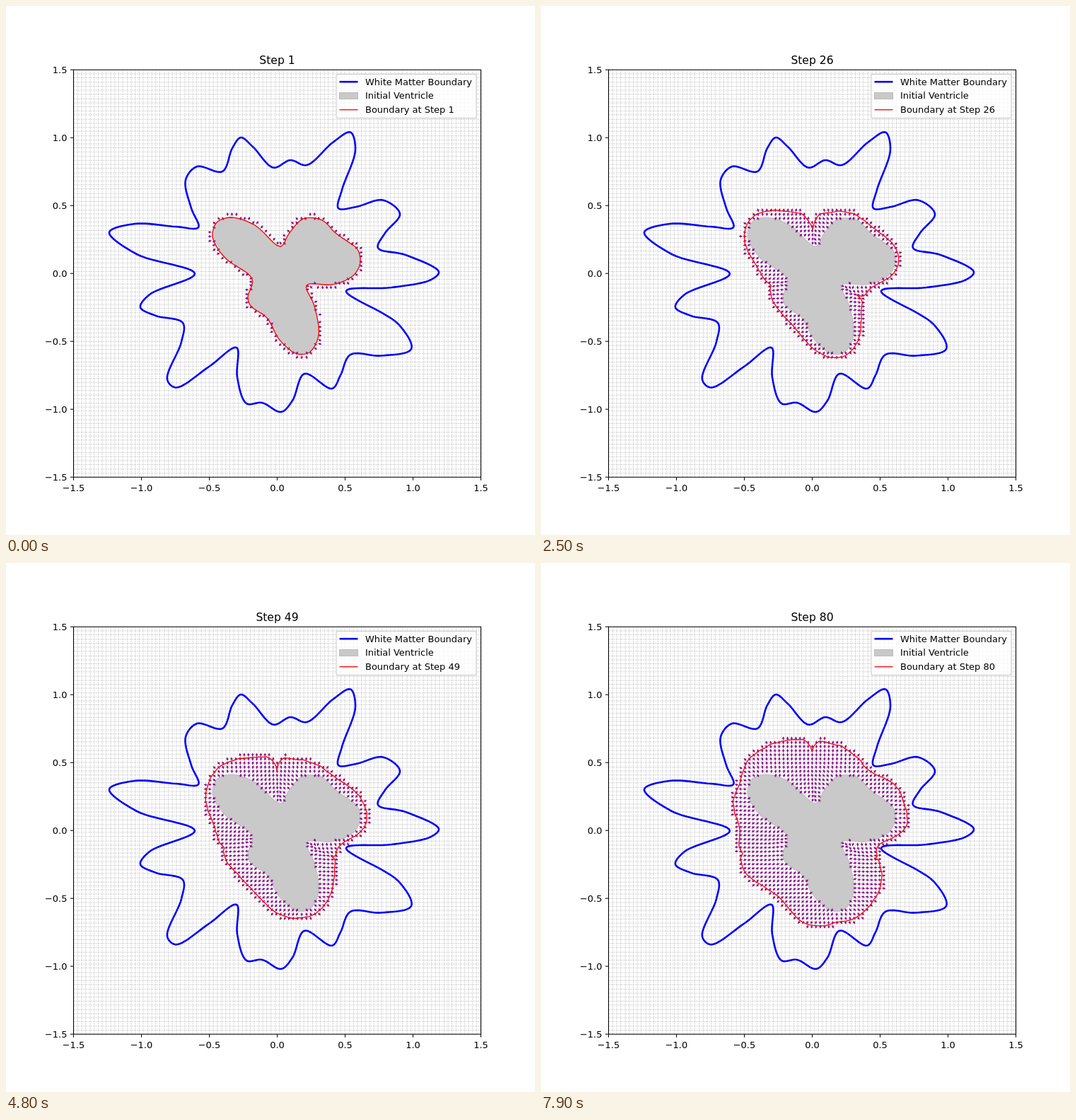
Animation, 748 px wide and 748 px high, one loop 8 s. Source, as an HTML page with a canvas:

```html
<!DOCTYPE html>
<html>
<head>
<meta charset="utf-8">
<style>
html, body { margin: 0; height: 100%; overflow: hidden; background: #fff }
canvas { display: block }
</style>
</head>
<body>
<canvas width="748" height="748"></canvas>
<script>
const ctx = document.querySelector('canvas').getContext('2d');
const STAGE = 748, LEFT = 95.5, TOP = 90.2, SIZE = 576, RIGHT = LEFT + SIZE, BOTTOM = TOP + SIZE;
const ZOOM = STAGE / 800, PT = ZOOM * 100 / 72;
const CELLS = 99, CELL = SIZE / CELLS, STEPS = 80;

const points = text => text.trim().split(/\s+/).map(p => p.split(',').map(Number));

// Key points at the tips, valleys and flanks of both outlines.
const whiteMatter = points(`
612,376 565,352 526,342 536,321 557,294 533,274.5 495,284 470,286 475,260 494,203 487,178.5
462,193 425,225 402,218 378,228.5 349,199 332,186 320,201 306,234 270,227 254,246 262,286
272,313 240,312 182,308 146,320 185,351 267,378.5 203,408 190,426 212,438 250,448 248,475
228,528 240,539.5 287,510 326,483 327,525 340,562 362,561 389,574 405,558 422,520 461,541
473,522 487,493 530,494.5 573,485 555,450 481,403 545,398 601,387`);
const initial = points(`
501,362 497,344 486,335 466,321 449,304 433,299.5 418,302 400,322 388,340 352,310
318,299 298,306 292,324 298,341 313,359 348,386 342,412 346,424 369,441 386,471
407,490 418,492.5 430,489 442,466 436,424 425,395 460,394 480,388 494,378`);

// Closed centripetal spline with n samples per span.
function spline(pts, n) {
  const at = i => pts[(i + pts.length) % pts.length];
  const gap = (a, b) => Math.sqrt(Math.hypot(a[0] - b[0], a[1] - b[1]));
  return pts.flatMap((b, i) => {
    const a = at(i - 1), c = at(i + 1), d = at(i + 2);
    const p = gap(a, b), q = gap(b, c), r = gap(c, d);
    return Array.from({ length: n }, (_, k) => {
      const t = k / n, s = 1 - t;
      return [0, 1].map(x => {
        const chord = c[x] - b[x];
        const m1 = q * ((b[x] - a[x]) / p - (c[x] - a[x]) / (p + q)) + chord;
        const m2 = q * ((d[x] - c[x]) / r - (d[x] - b[x]) / (q + r)) + chord;
        return b[x] + chord * t * t * (3 - 2 * t) + m1 * t * s * s - m2 * t * t * s;
      });
    });
  });
}

function closed(pts) {
  const path = new Path2D();
  pts.forEach(p => path.lineTo(...p));
  path.closePath();
  return path;
}

const outer = closed(spline(whiteMatter, 12));
const ventricle = closed(spline(initial, 8));

// Potential from the ventricle (0) to the white matter (1), solved by over-relaxation.
const H = 3, W = Math.ceil(STAGE / H) + 1;
const u = new Float64Array(W * W).fill(1), free = [];
for (let c = 0; c < W * W; c++) {
  const x = c % W * H, y = Math.floor(c / W) * H;
  if (ctx.isPointInPath(ventricle, x, y)) u[c] = 0;
  else if (ctx.isPointInPath(outer, x, y)) { u[c] = 0.5; free.push(c); }
}
for (let k = 0; k < 400; k++)
  for (const c of free)
    u[c] += 1.9 * ((u[c - 1] + u[c + 1] + u[c - W] + u[c + W]) / 4 - u[c]);

function potential(x, y) {
  const i = Math.floor(x / H), j = Math.floor(y / H), fx = x / H - i, fy = y / H - j, c = j * W + i;
  return (u[c] * (1 - fx) + u[c + 1] * fx) * (1 - fy) + (u[c + W] * (1 - fx) + u[c + W + 1] * fx) * fy;
}

const gradient = (x, y) => [
  (potential(x + H, y) - potential(x - H, y)) / (2 * H),
  (potential(x, y + H) - potential(x, y - H)) / (2 * H)
];

// Keep neighbouring front points closer than a grid cell.
const refine = pts => pts.flatMap((p, i) => {
  const q = pts[(i + 1) % pts.length];
  const far = Math.hypot(q[0] - p[0], q[1] - p[1]) > CELL;
  return far ? [p, [(p[0] + q[0]) / 2, (p[1] + q[1]) / 2]] : [p];
});

// The front climbs the potential, slowly where it is steep, and leaves one arrow per cell.
const fronts = [], arrows = [], visited = new Set();
let front = spline(initial, 6);
for (let step = 1; step <= STEPS; step++) {
  fronts[step] = closed(front);
  front = refine(front.map(([x, y]) => {
    const [gx, gy] = gradient(x, y), slope = Math.hypot(gx, gy);
    if (!slope) return [x, y];
    const i = Math.floor((x - LEFT) / CELL), j = Math.floor((y - TOP) / CELL), id = j * CELLS + i;
    if (!visited.has(id)) {
      visited.add(id);
      arrows.push({ step, x: LEFT + (i + 0.5) * CELL, y: TOP + (j + 0.5) * CELL, angle: Math.atan2(gy, gx) });
    }
    const speed = Math.min(1, (110 * slope) ** -1.3);
    return [x + gx / slope * speed, y + gy / slope * speed];
  }));
}

const arrowShape = new Path2D('M0-.6H1.8L1.4-1.9L5 0L1.4 1.9L1.8.6H0Z');

function stroke(path, color, points) {
  ctx.strokeStyle = color;
  ctx.lineWidth = points * PT;
  ctx.stroke(path);
}

function line(x1, y1, x2, y2, color, points) {
  const path = new Path2D();
  path.moveTo(x1, y1);
  path.lineTo(x2, y2);
  stroke(path, color, points);
}

function text(str, x, y, align, points = 10) {
  ctx.font = points * PT + 'px "DejaVu Sans", sans-serif';
  ctx.textAlign = align;
  ctx.fillStyle = '#000';
  ctx.fillText(str, x, y);
}

function region(path) {
  ctx.fillStyle = '#c9c9c9';
  ctx.fill(path);
  stroke(path, '#bcbcbc', 0.8);
}

function grid() {
  const color = 'rgba(128,128,128,.5)';
  const snap = v => (Math.floor(v / ZOOM) + 0.5) * ZOOM;
  ctx.setLineDash([1.85 * PT, 0.8 * PT]);
  for (let i = 0; i <= CELLS; i++) {
    const x = snap(LEFT + i * CELL), y = snap(TOP + i * CELL);
    line(x, BOTTOM, x, TOP, color, 0.5);
    line(LEFT, y, RIGHT, y, color, 0.5);
  }
  ctx.setLineDash([]);
}

function axes() {
  const frame = new Path2D();
  frame.rect(LEFT, TOP, SIZE, SIZE);
  stroke(frame, '#000', 0.8);
  for (let k = 0; k <= 6; k++) {
    const v = k / 2 - 1.5, d = k * SIZE / 6;
    const label = (v < 0 ? '\u2212' : '') + Math.abs(v).toFixed(1);
    line(LEFT + d, BOTTOM, LEFT + d, BOTTOM + 3.5 * PT, '#000', 0.8);
    line(LEFT - 3.5 * PT, BOTTOM - d, LEFT, BOTTOM - d, '#000', 0.8);
    text(label, LEFT + d, 685.5, 'center');
    text(label, LEFT - 7 * PT, BOTTOM - d + 5, 'right');
  }
}

function legend(step) {
  const box = new Path2D();
  box.roundRect(467, 96.5, 198, 62, 2.6);
  ctx.fillStyle = 'rgba(255,255,255,.8)';
  ctx.fill(box);
  stroke(box, 'rgba(204,204,204,.8)', 1);
  line(471.5, 107.2, 497.5, 107.2, '#00f', 2);
  const swatch = new Path2D();
  swatch.rect(471.5, 122.5, 26, 9);
  region(swatch);
  line(471.5, 146.7, 497.5, 146.7, '#f00', 1);
  const labels = ['White Matter Boundary', 'Initial Ventricle', 'Boundary at Step ' + step];
  labels.forEach((label, i) => text(label, 508, 111.7 + 19.6 * i, 'left'));
}

function draw(step) {
  ctx.fillStyle = '#fff';
  ctx.fillRect(0, 0, STAGE, STAGE);
  grid();
  region(ventricle);
  ctx.fillStyle = '#800080';
  for (const a of arrows) {
    if (a.step > step) break;
    ctx.save();
    ctx.translate(a.x, a.y);
    ctx.rotate(a.angle);
    ctx.fill(arrowShape);
    ctx.restore();
  }
  ctx.lineJoin = 'round';
  stroke(outer, '#00f', 2);
  stroke(fronts[step], '#f00', 1);
  ctx.lineJoin = 'miter';
  axes();
  text('Step ' + step, LEFT + SIZE / 2, 82.4, 'center', 12);
  legend(step);
}

let shown = 0;
const start = performance.now();
function tick() {
  const step = Math.floor((performance.now() - start) / 100) % STEPS + 1;
  if (step !== shown) draw(shown = step);
  requestAnimationFrame(tick);
}
tick();
</script>
</body>
</html>
```
